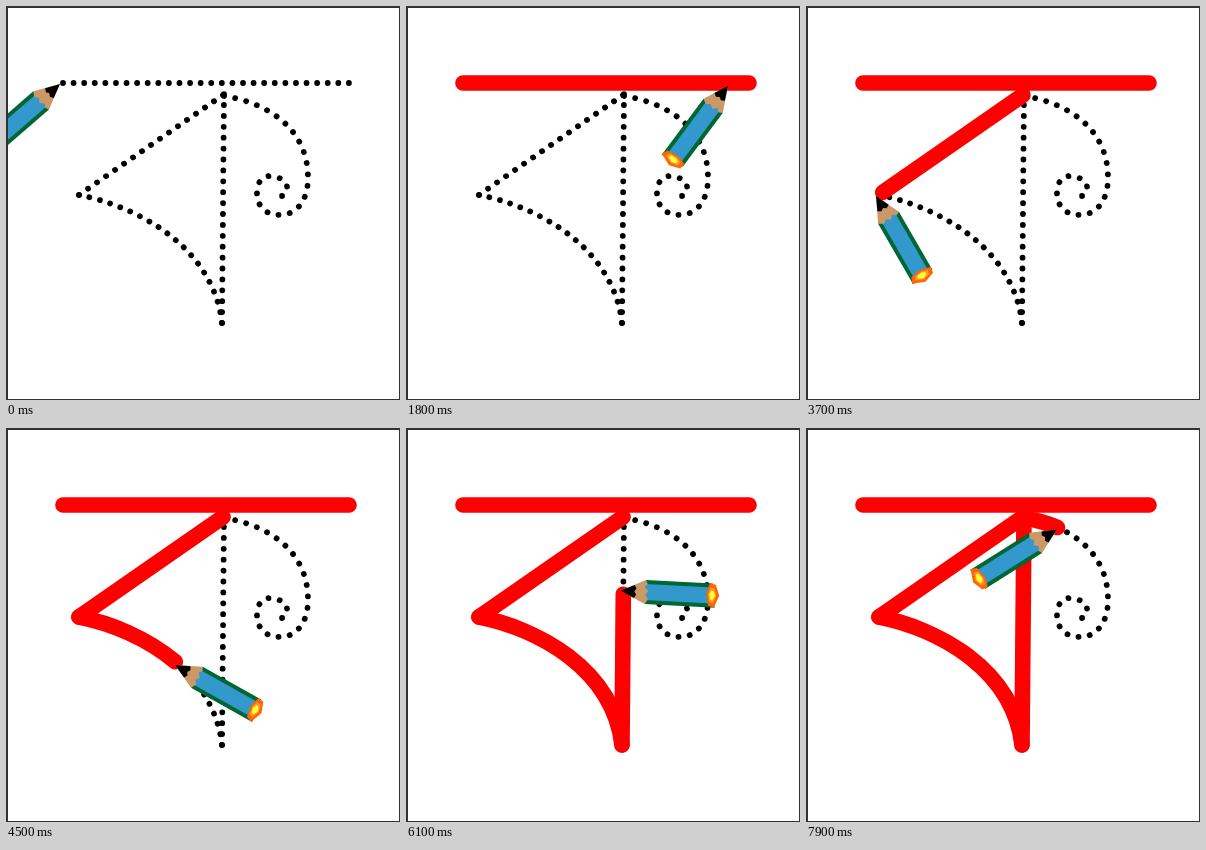
An HTML page that plays this animation: 394x394 px, repeating every 8 s.

```html
<!DOCTYPE html>
<html lang="en">
<head>
<meta charset="utf-8">
<title>Letter tracing</title>
<style>
html, body { margin: 0; width: 100%; height: 100%; overflow: hidden; background: #fff; }
svg { display: block; width: 100vw; height: 100vh; }
#guide path { fill: none; stroke: #000; stroke-width: 5.8; stroke-linecap: round; stroke-dasharray: .001 .999; }
#ink path { fill: none; stroke: #f00; stroke-width: 15.6; stroke-linecap: round; }
</style>
</head>
<body>
<svg viewBox="0 0 394 394">
  <g id="guide"></g>
  <g id="ink"></g>
  <!-- tip at the origin, body along +x -->
  <g id="pencil">
    <path fill="#063" d="M25-12H92L95 12H25Z"/>
    <path fill="#39c" d="M24-8H92V8H24Z"/>
    <path fill="#c96" d="M0 0L25-12L27-8L24-5L28-1L25 3L28 7L25 12Z"/>
    <path d="M0 0L14-6.5L16-3L14 0L16 3L14 6.5Z"/>
    <path fill="#f60" d="M89-12L95-11L99 0L94 12.500L88 10L86-2Z"/>
    <path fill="#f93" d="M90-8L94-7L96 0L93 8L89 6L88-2Z"/>
    <path fill="#ff3" d="M91-5L93.500-4L95 0L92.500 5L90 4L89-1Z"/>
  </g>
  <rect x="1" y="1" width="393" height="393" fill="none" stroke="#333" stroke-width="2"/>
</svg>
<script>
// Pencil turns from angle a to b while tracing; hop is the ms spent moving to the stroke's start.
const strokes = [
  { d: 'M57 77H343', gaps: 27, start: 0, time: 1410, a: 139, b: 137, hop: 0 },
  { d: 'M217 89L73 189', gaps: 16, start: 2700, time: 1000, a: 64, b: 60, hop: 1050 },
  { d: 'M73 189C130 200 207 240 216 317', gaps: 19, start: 3700, time: 1480, a: 60, b: 3, hop: 0 },
  { d: 'M216 317L218 88', gaps: 21, start: 5225, time: 1290, a: 3, b: 3, hop: 45 },
  { d: 'M218 90C258 96 302 120 302 172C302 195 290 209 274 209S251 199 251 187S257 170 265 170S281 176 281 181S278 190 276 190',
    gaps: 24, start: 7530, time: 2700, a: 138, b: 210, hop: 1000, lift: 22 }
];

const LOOP = 8000, STEP = 100, INK_LAG = 25;
const NUDGE = { x: -3, y: 1 };
const byId = id => document.getElementById(id);
const mix = (a, b, s) => a + (b - a) * s;
const progress = (stroke, t) => Math.min(1, Math.max(0, (t - stroke.start) / stroke.time));

function addPath(parent, { d, gaps }) {
  const path = document.createElementNS('http://www.w3.org/2000/svg', 'path');
  path.setAttribute('d', d);
  path.setAttribute('pathLength', gaps + .01);
  return byId(parent).appendChild(path);
}

for (const stroke of strokes) {
  stroke.guide = addPath('guide', stroke);
  stroke.ink = addPath('ink', stroke);
}

function tracePose({ guide, a, b }, p) {
  const { x, y } = guide.getPointAtLength(p * guide.getTotalLength());
  return { x, y, angle: mix(a, b, p) };
}

function poseAt(t) {
  const i = strokes.findLastIndex(s => t >= s.start - s.hop);
  const stroke = strokes[i];
  if (t >= stroke.start) return tracePose(stroke, progress(stroke, t));
  const from = tracePose(strokes[i - 1], 1), to = tracePose(stroke, 0);
  const s = 1 - (stroke.start - t) / stroke.hop;
  return {
    x: mix(from.x, to.x, s),
    y: mix(from.y, to.y, s) - (stroke.lift || 0) * Math.sin(Math.PI * s),
    angle: mix(from.angle, to.angle, s)
  };
}

function draw(now) {
  const t = Math.floor(now % LOOP / STEP) * STEP;
  strokes.forEach((stroke, i) => {
    const done = progress(stroke, i ? t - INK_LAG : t);
    stroke.ink.style.display = done ? '' : 'none';
    stroke.ink.style.strokeDasharray = done < 1 ? `${done * stroke.gaps} 99` : 'none';
  });
  const { x, y, angle } = poseAt(t);
  byId('pencil').setAttribute('transform',
    `translate(${x + NUDGE.x} ${y + NUDGE.y}) rotate(${angle})`);
}

const begin = performance.now();
function tick() {
  draw(performance.now() - begin);
  requestAnimationFrame(tick);
}
tick();
</script>
</body>
</html>
```
